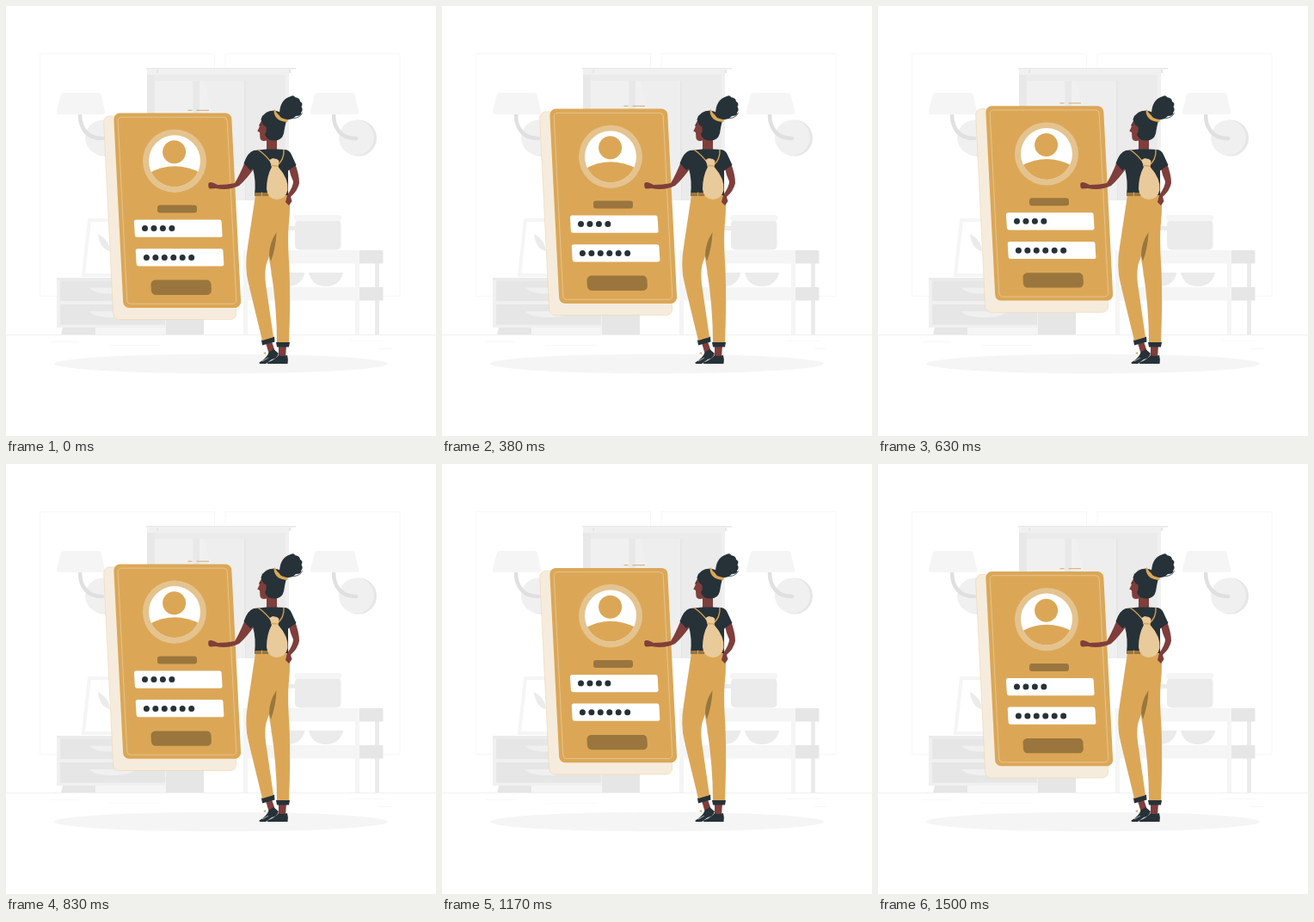
An HTML page with a canvas for the animation above (1540 ms loop, 500 by 500 pixels).

```html
<!DOCTYPE html>
<html lang="en">
<head>
<meta charset="utf-8">
<title>Login card</title>
<style>
  html, body { margin: 0; width: 100%; height: 100%; overflow: hidden; background: #fff; }
  canvas { display: block; width: 100vw; height: 100vh; }
</style>
</head>
<body>
<canvas id="stage" width="500" height="500"></canvas>
<script>
const ctx = document.getElementById('stage').getContext('2d');

const LOOP = 1540, STEPS = 37, STEP = LOOP / STEPS;
const GOLD = '#dba757', DARK = '#263238', SKIN = '#7f3e3b', BROWN = '#9a763e';
const PALE = '#f5f5f5', LIGHT = '#f0f0f0', GREY = '#e6e6e6', MID = '#ebebeb';

function fill(path, color) {
  ctx.fillStyle = color;
  ctx.fill(new Path2D(path));
}

function stroke(path, color, width = 1) {
  ctx.strokeStyle = color;
  ctx.lineWidth = width;
  ctx.stroke(new Path2D(path));
}

function rect(x, y, w, h, color, radius = 0) {
  ctx.fillStyle = color;
  ctx.beginPath();
  ctx.roundRect(x, y, w, h, radius);
  ctx.fill();
}

function oval(x, y, rx, ry, color) {
  ctx.fillStyle = color;
  ctx.beginPath();
  ctx.ellipse(x, y, rx, ry, 0, 0, Math.PI * 2);
  ctx.fill();
}

// Box whose lower edge is shifted sideways by `lean`.
function leaningBox(x, y, w, h, lean, radius) {
  const corners = [[x + w, y], [x + w + lean, y + h], [x + lean, y + h], [x, y]];
  ctx.beginPath();
  ctx.moveTo(x + w / 2, y);
  corners.forEach(([cx, cy], i) => {
    const [nx, ny] = corners[(i + 1) % 4];
    ctx.arcTo(cx, cy, nx, ny, radius);
  });
  ctx.closePath();
}

function fillBox(color, ...box) {
  leaningBox(...box);
  ctx.fillStyle = color;
  ctx.fill();
}

function strokeBox(color, width, ...box) {
  leaningBox(...box);
  ctx.strokeStyle = color;
  ctx.lineWidth = width;
  ctx.stroke();
}

function drawLamp(dx) {
  ctx.save();
  ctx.translate(dx, 0);
  oval(410, 153.5, 21, 21, GREY);
  oval(407.5, 153, 20.5, 20.5, LIGHT);
  ctx.lineCap = 'round';
  stroke('M381 126C381 143 390 154 407 154', '#e0e0e0', 4.5);
  ctx.lineCap = 'butt';
  fill('M362 101H402Q404.500 101 405.500 103L410 122Q411 126 407 126H357Q353 126 354 122L359 103Q360 101 362 101Z', PALE);
  ctx.restore();
}

function drawWindow() {
  rect(164, 80, 165, 146, MID);
  rect(164, 74, 165, 6, LIGHT);
  rect(163, 72, 174, 1.6, GREY);
  rect(175, 74, 2, 4, GREY);
  rect(329, 74, 2, 4, GREY);
  rect(164, 80, 9, 146, '#e8e8e8');
  rect(173, 87, 44, 100, LIGHT);
  rect(218, 87, 10, 100, '#e8e8e8');
  rect(228, 87, 49, 100, '#eeeeee');
  fill('M225 87H231L239 124H225Z', LIGHT);
  rect(277.500, 87, 1, 139, '#e2e2e2');
  rect(325, 80, 4, 146, LIGHT);
  rect(262, 187, 16, 39, LIGHT);
}

function drawCabinet() {
  stroke('M97 249H140L134 313H90Z', PALE, 4);
  fill('M107 265Q120 272 121 285Q109 283 107 265Z', MID);
  rect(59, 316, 130, 58, LIGHT);
  rect(186, 316, 44, 66, GREY);
  rect(59, 316, 127, 3, MID);
  for (const y of [319.5, 347]) {
    rect(63, y, 122, 23.5, GREY);
    fill(`M97 ${y + 8}H150Q145 ${y + 15} 123 ${y + 15}Q102 ${y + 15} 97 ${y + 8}Z`, LIGHT);
  }
  fill('M66 374H104V382H64Z', GREY);
  rect(104, 374, 82, 8, PALE);
}

function drawTable() {
  for (const x of [276, 406]) rect(x, 298, 5, 84, PALE);
  rect(429, 298, 5, 84, MID);
  for (const y of [284, 327]) {
    rect(276, y, 136, 15.5, PALE);
    rect(411, y, 27.5, 15.5, GREY);
  }
  for (const x of [327.5, 372]) fill(`M${x - 20} 310H${x + 20}Q${x + 16} 326 ${x} 326Q${x - 16} 326 ${x - 20} 310Z`, MID);
  rect(325, 256, 14, 5, MID);
  rect(336, 249, 53.5, 34.5, MID, 5);
  rect(335, 243, 55, 7, PALE, 3);
}

function drawRoom() {
  for (const x of [39.5, 255]) stroke(`M${x} 55.500h203v282h-203Z`, PALE, .8);
  drawWindow();
  drawLamp(-295);
  drawLamp(0);
  drawCabinet();
  drawTable();
  stroke('M0 382.500H500', '#ebebeb', .7);
  stroke('M51 390.500H84M120 394.500H180M400 389.500H440M433 398.500H448', PALE, .7);
  oval(250, 416, 194, 11.3, PALE);
}

function drawDots(count, x, y) {
  for (let i = 0; i < count; i++) oval(x + i * 10.45, y, 3.5, 3.5, DARK);
}

function drawAvatar() {
  oval(196, 180.6, 37, 36.7, '#e5c38e');
  ctx.save();
  ctx.beginPath();
  ctx.arc(196, 180.6, 30, 0, Math.PI * 2);
  ctx.clip();
  rect(160, 145, 72, 72, '#fff');
  fill('M164 196Q196 177.500 229 196V220H164Z', GOLD);
  oval(195.6, 170.2, 13.5, 13.5, GOLD);
  ctx.restore();
}

function drawCard(lift) {
  ctx.save();
  ctx.translate(0, lift);
  fillBox('#f6ecdd', 113.3, 128.3, 143, 236.7, 11.7, 7);
  strokeBox('#ecd5ae', .6, 113.3, 128.3, 143, 236.7, 11.7, 7);
  stroke('M211.500 121.700H216.500M221.500 121.700H236', '#d0a465', .9);
  fillBox(GOLD, 125, 125, 137, 226.3, 11.5, 7);
  strokeBox('#e9cb9a', .8, 130, 129.700, 127, 217, 11, 4);
  drawAvatar();
  rect(176, 232, 46, 9, BROWN, 3);
  fillBox('#fff', 148.8, 249, 101.7, 20.2, 1.2, 2.5);
  fillBox('#fff', 150.6, 282.6, 101.7, 20.2, 1.2, 2.5);
  drawDots(4, 161.5, 259);
  drawDots(6, 163.4, 292.9);
  fillBox(BROWN, 168.2, 319, 70, 17.3, 1, 5);
  ctx.restore();
}

function drawLegs() {
  // ankles, shoes and cuffs
  fill('M302 392L309 390L313 402L306 405Z', SKIN);
  fill('M317 395H326L325 409H317Z', SKIN);
  fill('M299 404L302 402L302 405Z', GOLD);
  fill('M294.500 414.500Q303 410 306 402Q309 401 311 399L317 404Q315 410 309 411L302 416H296Q294 416 294.500 414.500Z', DARK);
  stroke('M298 413L305 409', '#fff', .6);
  fill('M304 414.500Q313 411 317 406Q321 408 327 406Q328.500 411 327.500 416H304.500Q303 415.500 304 414.500Z', DARK);
  fill('M297 388.500L312 384.500L312.500 390.500L298 394.500Z', DARK);
  fill('M314 391H330L329 396.500H315Z', DARK);
  // trousers
  fill('M290 220H318Q317 262 305 294Q299 306 303 330L311 385L298 389L282 323Q277 303 281 280Z', GOLD);
  fill('M304 220H329Q331 232 329 252Q327 270 329.500 305Q331 345 329 391H315Q315 350 308 306L306 293Q312 270 304 220Z', GOLD);
  fill('M314.500 263Q306 276 306 290L308 297Q314 280 314.500 263Z', BROWN);
}

function drawArms() {
  fill('M278 181L289 188Q280 201 271 209Q258 215 244 212L237 212.500Q234.500 211 235.500 206Q238 203.500 246 208Q257 208 266 206Q271 198 278 181Z', SKIN);
  fill('M329 189L336 183Q341 196 341 206Q339 215 331 222L332.500 227L329 232L325 228L327 220Q334 210 334 204Q331 198 329 189Z', SKIN);
}

function drawTorso() {
  fill('M303 153H315L315 168Q309 172 303 168Z', SKIN);
  fill('M303 166.500H315L325 167Q330 168 332 173L337.500 185L328 191.500V220H289Q291 203 287 189L284 191L276.500 183Q281 170 288 168Z', DARK);
  fill('M289 217H305V221H289Z', BROWN);
  stroke('M297.500 216.500V221', GOLD, 1);
}

function drawBag() {
  stroke('M293 167Q302 173 310 184M323 167Q324 178 315 186', GOLD, 1.3);
  fill('M306.500 179L310 177L315 178L317.500 180L316.500 187Q329 201 327.500 214Q325 225 315 225Q304 224 303 213Q303 198 309 187Z', '#e9ca9a');
  stroke('M308 185.500L317 186', GOLD, 1.4);
}

function drawHead() {
  fill('M298 132Q294 137 294.500 141L292.300 145.500L295 147L295.500 154Q297 158 303 156.500L311 150V133Z', SKIN);
  stroke('M294.500 138.500L297 137.500', DARK, 1);
  fill('M296.500 132Q299 122 312 121.500Q323 123 326 133Q324 141 323 148Q321 156 313 156.500Q303 157 301 149Q304 145 302 140Q298 139 296.500 132Z', DARK);
  fill('M312.500 120Q316 130 329 130.500L327 135Q312 134 311.500 122Z', GOLD);
  fill('M318 126Q318 109 331 105Q335 103 336 106Q342 107 342 111Q346 113 343.500 117Q346 121 343 124Q344 128 337 128Q331 134 323 131Q318 130 318 126Z', DARK);
  stroke('M328 130.500Q342 132 344.500 124', DARK, .8);
}

function drawWoman() {
  drawLegs();
  drawArms();
  drawTorso();
  drawBag();
  drawHead();
}

// Linear float of ten pixels up and down with a short rest at the bottom.
function liftAt(time) {
  const phase = (time + 30) % LOOP;
  return -10 * Math.max(0, 1 - Math.abs(phase - 750) / 750);
}

function render(now) {
  const step = Math.floor((now + 3) / STEP) % STEPS;
  ctx.fillStyle = '#fff';
  ctx.fillRect(0, 0, 500, 500);
  drawRoom();
  drawCard(liftAt(step * STEP));
  drawWoman();
}

let start;
function tick(now) {
  start ??= now;
  render(now - start);
  requestAnimationFrame(tick);
}

render(0);
requestAnimationFrame(tick);
</script>
</body>
</html>
```
